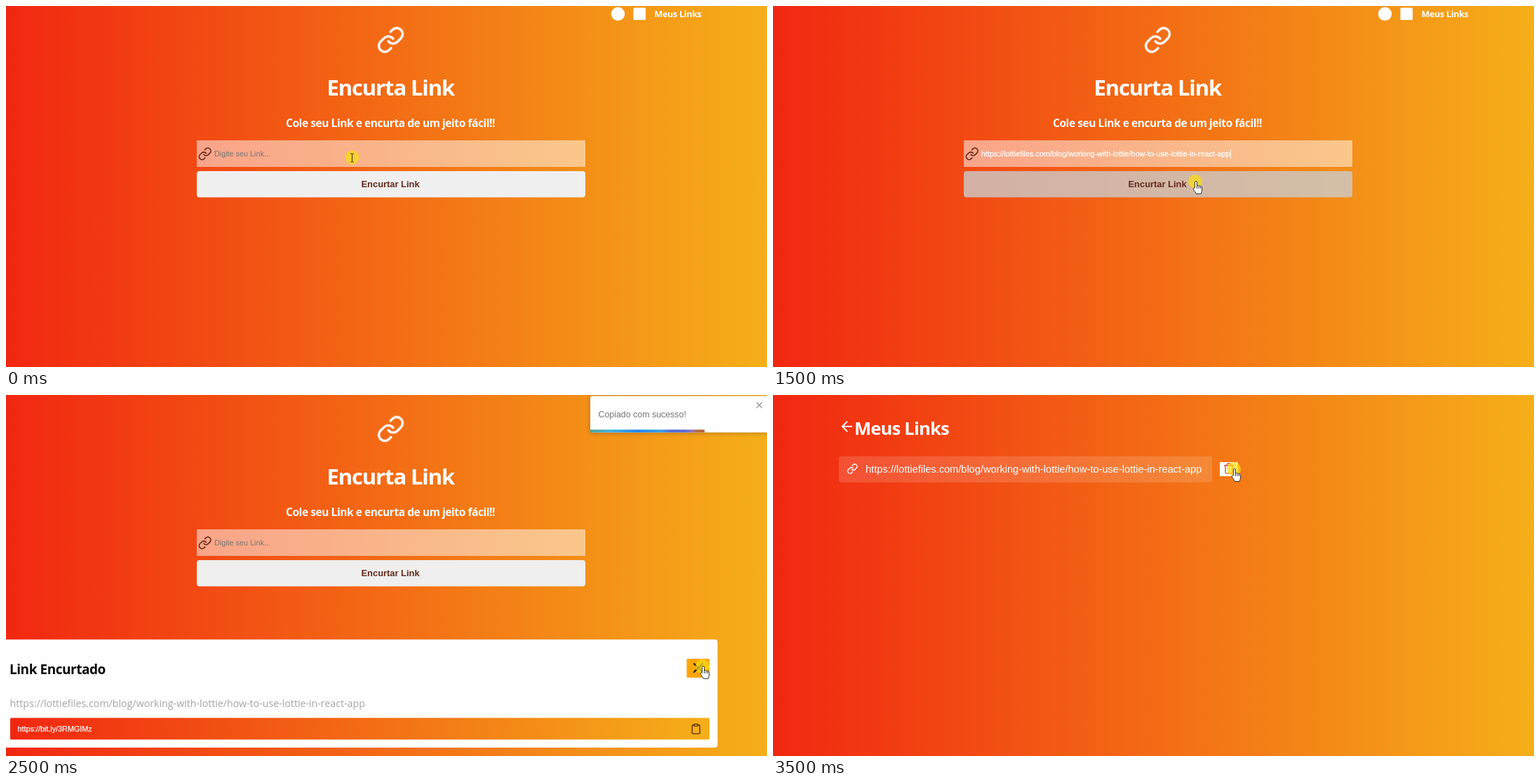
An HTML page that plays this animation: 1085x516 px, repeating every 4000 ms.

```html
<!DOCTYPE html>
<html lang="pt-BR">
<head>
<meta charset="utf-8">
<title>Encurta Link</title>
<style>
  html, body { margin: 0; width: 100%; height: 100%; overflow: hidden; background: #f36b15; }
  svg.stage { display: block; width: 100vw; height: 100vh; }

  text { font-family: "Liberation Sans", Arial, sans-serif; font-size: 10.8px; fill: #fff; }
  .ui { font-family: "Open Sans", "Noto Sans", sans-serif; }
  .bold { font-weight: 700; }
  .crisp { stroke: #fff; stroke-width: .25; }
  .brown { fill: #64291a; }
  .line { fill: none; stroke: currentColor; stroke-width: 2; stroke-linecap: round; stroke-linejoin: round; }
  .halo { fill: #fadc14; fill-opacity: .72; }
  .toast { filter: drop-shadow(0 1px 3px rgba(0, 0, 0, .25)); }

  /* The loop has eight slots of 500 ms; --t is the slot where a part changes. */
  .one, .two, .hole { animation: one 4s step-end calc(var(--t) * 500ms - 4s) infinite; }
  .two { animation-name: two; }
  .hole { animation-name: hole; }
  @keyframes one { 0% { opacity: 1 } 12.5%, 100% { opacity: 0 } }
  @keyframes two { 0% { opacity: 1 } 25%, 100% { opacity: 0 } }
  @keyframes hole { 0% { opacity: 0 } 12.5%, 100% { opacity: 1 } }
</style>
</head>
<body>
<svg class="stage" viewBox="0 0 1085 516" preserveAspectRatio="none">
  <defs>
    <linearGradient id="flare">
      <stop stop-color="#f12711"/><stop offset="1" stop-color="#f5af19"/>
    </linearGradient>
    <linearGradient id="rainbow">
      <stop stop-color="#4aa594"/><stop offset=".18" stop-color="#3fb0e0"/>
      <stop offset=".42" stop-color="#1e82f0"/><stop offset=".62" stop-color="#35a0e4"/>
      <stop offset=".7" stop-color="#5068d8"/><stop offset=".82" stop-color="#5568d4"/>
      <stop offset=".9" stop-color="#9075b0"/><stop offset=".93" stop-color="#b8643c"/>
    </linearGradient>
    <symbol id="link" viewBox="0 0 24 24">
      <path class="line" d="M10 13a5 5 0 0 0 7.54.54l3-3a5 5 0 0 0-7.07-7.07l-1.72 1.71M14 11a5 5 0 0 0-7.54-.54l-3 3a5 5 0 0 0 7.07 7.07l1.71-1.71"/>
    </symbol>
    <symbol id="clip" viewBox="0 0 24 24">
      <path class="line" d="M16 4h2a2 2 0 0 1 2 2v14a2 2 0 0 1-2 2H6a2 2 0 0 1-2-2V6a2 2 0 0 1 2-2h2"/>
      <rect class="line" x="8" y="2" width="8" height="4" rx="1"/>
    </symbol>
    <symbol id="trash" viewBox="0 0 24 24">
      <path class="line" d="M3 6h18M19 6v14a2 2 0 0 1-2 2H7a2 2 0 0 1-2-2V6m3 0V4a2 2 0 0 1 2-2h4a2 2 0 0 1 2 2v2"/>
    </symbol>
    <symbol id="back" viewBox="0 0 24 24">
      <path class="line" d="M19 12H5M12 19l-7-7 7-7"/>
    </symbol>
    <g id="hand">
      <circle class="halo" r="10"/>
      <path transform="translate(1)" fill="#fff" stroke="#222" stroke-width=".9" stroke-linejoin="round"
        d="M-1.5 9V1a1.5 1.5 0 0 1 3 0v5.2c.3-1 2.4-1 2.6.3.6-.8 2.2-.6 2.4.5.8-.6 2 0 2 1.2V12c0 2-1 3-1.3 5.5H.2C0 15.5-2.4 13.8-3.6 11c-.7-1.6 1-2.4 2.1-2zM1.5 6v4M4.1 6.5V10M6.5 7v3"/>
    </g>
  </defs>

  <rect width="1085" height="516" fill="url(#flare)"/>

  <!-- Home -->
  <g class="hole" style="--t:7">
    <circle cx="872.5" cy="11.3" r="9.7" fill="#fff"/>
    <rect x="894.5" y="2.5" width="17.5" height="17.5" rx="1.5" fill="#fff"/>
    <text class="ui bold" x="924.5" y="15.5" style="font-size:12.5px;letter-spacing:-.023em">Meus Links</text>

    <use href="#link" x="528" y="28" width="41" height="41" color="#fff"/>
    <text class="ui bold" x="457.5" y="127.5" style="font-size:31px;letter-spacing:-.036em">Encurta Link</text>
    <text class="ui bold" x="399" y="173" style="font-size:15.5px;letter-spacing:-.028em">Cole seu Link e encurta de um jeito fácil!!</text>

    <rect x="272" y="192" width="554" height="38" fill="#fff" fill-opacity=".5"/>
    <use href="#link" x="273.7" y="201.3" width="20" height="20" color="#64291a"/>

    <g class="hole" style="--t:3">
      <text x="297" y="215" style="fill:#757575">Digite seu Link...</text>
      <rect x="272" y="236" width="554" height="37.5" rx="4" fill="#efefef"/>
    </g>
    <rect class="one" style="--t:1" x="297" y="205" width="1" height="13" fill="#fff"/>
    <g class="one" style="--t:3">
      <text class="crisp" x="297" y="215">https://lottiefiles.com/blog/working-with-lottie/how-to-use-lottie-in-react-app</text>
      <rect x="652" y="205" width="1" height="13" fill="#fff"/>
      <rect x="272" y="236" width="554" height="37.5" rx="4" fill="#cbcbcb" fill-opacity=".8"/>
    </g>
    <text class="bold brown" x="506.5" y="258.7" style="font-size:12.9px">Encurtar Link</text>
  </g>

  <!-- Shortened link -->
  <g class="two" style="--t:4">
    <rect x="-8" y="349.5" width="1022.5" height="154.5" rx="4" fill="#fff"/>
    <text class="ui bold" x="5" y="398.5" style="font-size:19px;letter-spacing:-.024em;fill:#0a0a0a">Link Encurtado</text>
    <rect x="970.5" y="377" width="32.5" height="27" rx="1.5" fill="#ffa500"/>
    <path class="line" color="#111" d="M981 384l12 12M993 384l-12 12"/>
    <text class="ui" x="5.5" y="446" style="font-size:14.2px;fill:#a4a4a4">https://lottiefiles.com/blog/working-with-lottie/how-to-use-lottie-in-react-app</text>
    <rect x="6" y="461.5" width="997" height="31" rx="1.5" fill="url(#flare)"/>
    <text class="crisp" x="16.5" y="481">https://bit.ly/3RMGIMz</text>
    <use href="#clip" x="975.5" y="469" width="16.5" height="16.5" color="#55300f"/>
  </g>

  <!-- Toast -->
  <g class="one" style="--t:5">
    <rect class="toast" x="833" y="1.5" width="256" height="52" rx="3" fill="#fff"/>
    <rect x="833" y="49.5" width="163" height="4" fill="url(#rainbow)"/>
    <text x="844.5" y="31.5" style="font-size:12.4px;fill:#757575">Copiado com sucesso!</text>
    <path class="line" color="#9a9a9a" style="stroke-width:1.5" d="M1070.500 11l7 7M1077.500 11l-7 7"/>
  </g>

  <!-- Status bar -->
  <g class="one" style="--t:6">
    <rect x="-4" y="502" width="170.500" height="18" rx="3" fill="#dfe1e5"/>
    <text class="ui" x="-2" y="513" style="font-size:9.15px;fill:#5f6368">https://encurtadorlinks.vercel.app/link</text>
  </g>

  <!-- My links -->
  <g class="one" style="--t:7">
    <use href="#back" x="94" y="33.500" width="23" height="23" color="#fff"/>
    <text class="ui bold" x="116" y="57" style="font-size:25.5px;letter-spacing:-.03em">Meus Links</text>
    <rect x="94" y="87.500" width="532" height="37.500" rx="3" fill="#fff" fill-opacity=".15"/>
    <use href="#link" x="105.200" y="97.500" width="16" height="16" color="#fff"/>
    <text x="132" y="110.500" style="font-size:14.6px">https://lottiefiles.com/blog/working-with-lottie/how-to-use-lottie-in-react-app</text>
    <rect x="637" y="96" width="26" height="20" fill="#fff"/>
    <use href="#trash" x="641.500" y="96.500" width="17" height="17" color="#e0502e"/>
  </g>

  <!-- Pointer -->
  <g class="one" style="--t:0">
    <circle class="halo" cx="493.500" cy="216.500" r="10"/>
    <path d="M491 211h2l.5.5.5-.5h2M493.500 211.500v11M491 223h2l.5-.5.5.5h2" fill="none" stroke="#3a3320"/>
  </g>
  <use class="one" style="--t:3" href="#hand" x="602" y="251"/>
  <g class="one" style="--t:4" transform="translate(983 477)">
    <circle class="halo" r="10"/>
    <path d="M0 0v12l2.800-2.600 2 4.600 2-.9-2-4.400h3.700z" fill="#fff" stroke="#111" stroke-width=".9"/>
  </g>
  <use class="one" style="--t:5" href="#hand" x="993" y="388"/>
  <use class="one" style="--t:6" href="#hand" x="957" y="17"/>
  <use class="one" style="--t:7" href="#hand" x="657" y="106"/>
</svg>
</body>
</html>
```
